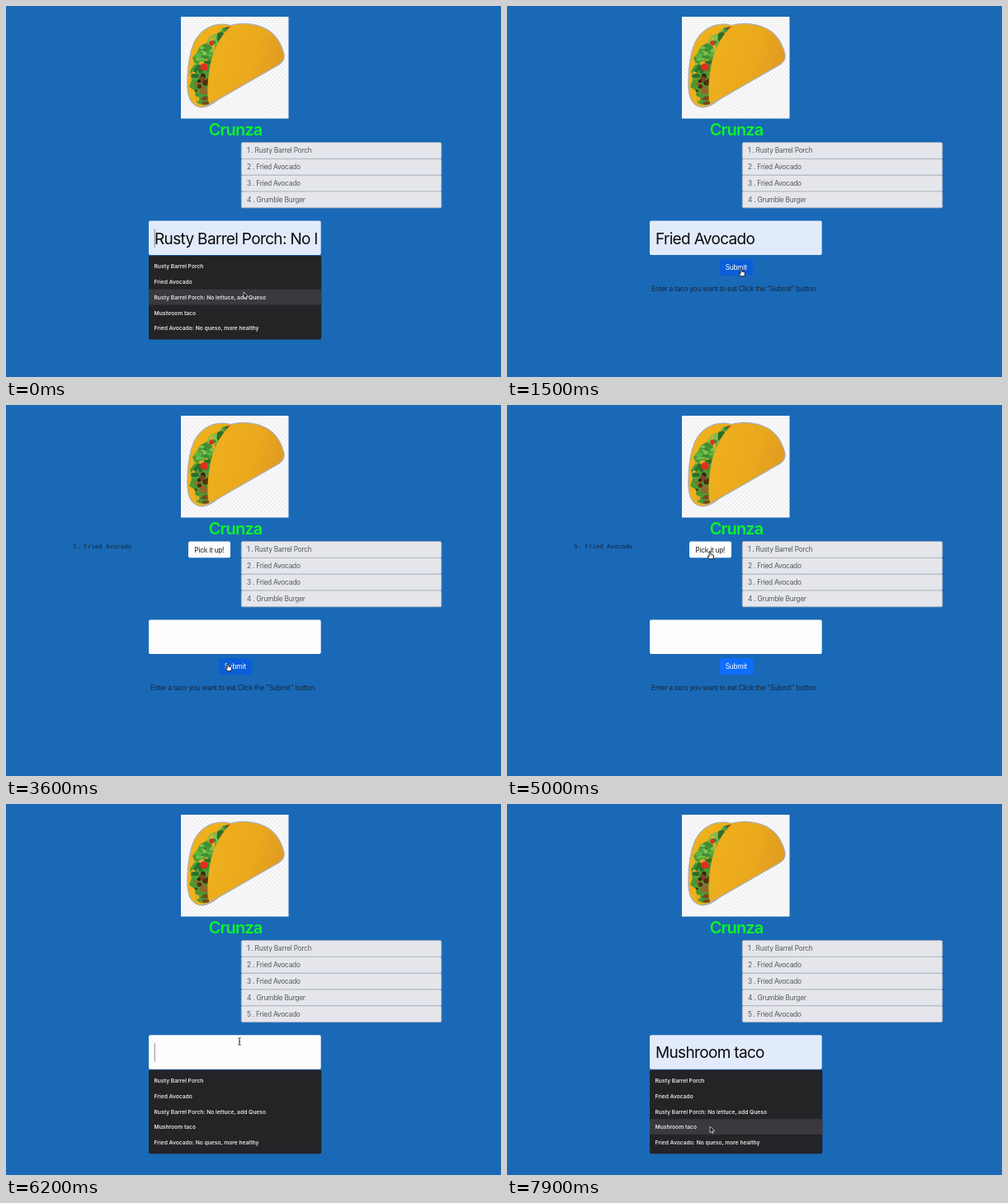
An HTML page that plays this animation: 600 by 450 pixels, repeating every 8000 ms.

```html
<!DOCTYPE html>
<html lang="en">
<head>
<meta charset="utf-8">
<title>Taco orders</title>
<style>
  html, body { margin: 0; width: 100%; height: 100%; overflow: hidden; background: #1a69b6; }
  svg { display: block; width: 600px; height: 450px; cursor: default; }
  text { font: 8.4px Inter, Roboto, sans-serif; letter-spacing: -.03em; white-space: pre; }
  .title { font-size: 20px; font-weight: 600; letter-spacing: -.045em; fill: #0cf52a; }
  .item rect { fill: #e5e6eb; stroke: #aeb3be; stroke-width: .8; }
  .item text { fill: #55595f; }
  .mono { font: 7.4px "DejaVu Sans Mono", monospace; letter-spacing: 0; fill: #12273b; }
  .field { font-size: 19px; letter-spacing: -.035em; fill: #0b0b0d; }
  .option { font-size: 6.7px; font-weight: 600; letter-spacing: 0; fill: #e4e4e6; }
  .hint { fill: #15283c; }
  .light { fill: #fff; }
</style>
</head>
<body>
<svg viewBox="0 0 600 450">
  <defs>
    <pattern id="checks" width="5" height="5" patternUnits="userSpaceOnUse">
      <rect width="5" height="5" fill="#fbfbfc"/>
      <path d="M0 0h2.5v2.5H0zM2.5 2.5H5V5H2.5z" fill="#f0f0f2"/>
    </pattern>
    <linearGradient id="shell" x1="0" y1=".2" x2="1" y2=".5">
      <stop offset="0" stop-color="#efb01c"/>
      <stop offset=".6" stop-color="#eaa91d"/>
      <stop offset="1" stop-color="#e09a22"/>
    </linearGradient>
    <clipPath id="fillClip">
      <path d="M275 24L262 27L256 33L247 37L243 45L235 49L231 57L226 63L229 70L223 79L225 90L222 98L229 103L231 117Q237 122 246 119Q243 70 275 24Z"/>
    </clipPath>
    <clipPath id="fieldClip"><rect x="179" y="261" width="198.500" height="41"/></clipPath>
  </defs>

  <rect width="600" height="450" fill="#1a69b6"/>
  <rect x="212" y="13" width="130.500" height="123.500" fill="url(#checks)"/>

  <g id="taco">
    <path d="M264 22Q240 22 228 44Q219 65 220 99Q221 121 237 123Q250 122 260 110L276 24Z"
      fill="#efb01c" stroke="#a9aeb5" stroke-width="1.200"/>
    <g id="filling" clip-path="url(#fillClip)"></g>
    <path d="M274 23Q291 19 309 25Q331 33 337 59Q338 66 331 71L251 117Q246 120 245 114Q243 94 248 69Q254 41 274 23Z"
      fill="url(#shell)"/>
    <path d="M274 23Q291 19 309 25Q331 33 337 59Q338 66 331 71L251 117Q246 121 237 123"
      fill="none" stroke="#a9aeb5" stroke-width="1.200"/>
    <g id="specks" fill="#d98f16" opacity=".45"></g>
  </g>

  <text class="title" x="278" y="157" text-anchor="middle">Crunza</text>
  <g id="list"></g>

  <g id="pending">
    <text class="mono" x="81" y="173.500">5. Fried Avocado</text>
    <rect x="221" y="165.500" width="51" height="19.800" rx="2" fill="#fdfdfd"/>
    <text x="246.300" y="178.500" text-anchor="middle" fill="#1c1e21">Pick it up!</text>
  </g>

  <g id="form">
    <rect id="ring" x="255.300" y="305.300" width="45" height="23.500" rx="4" fill="#1363c9"/>
    <rect id="submit" x="257.700" y="307.300" width="40.500" height="19.600" rx="2"/>
    <text class="light" x="277.700" y="320" text-anchor="middle">Submit</text>
    <text class="hint" x="175" y="346">Enter a taco you want to eat Click the "Submit" button.</text>
    <rect id="box" x="173" y="260.500" width="208.700" height="41.500" rx="2"/>
    <g clip-path="url(#fieldClip)"><text id="value" class="field" x="180" y="288.700"></text></g>
    <path id="caret" d="M180.200 270.500V293" stroke="#777c86" stroke-width=".9"/>
    <g id="menu">
      <rect x="173" y="302.800" width="209.300" height="101.700" rx="2" fill="#242326"/>
      <rect id="band" x="173" width="209.300" height="18.700" fill="#3a393d"/>
    </g>
  </g>

  <g id="pointer" stroke-linejoin="round">
    <path id="arrow" d="M0 0V7.500L1.800 6L3 8.600L4.300 8L3.100 5.400H5.500Z" fill="#101114" stroke="#f2f2f2" stroke-width=".7"/>
    <path id="hand" d="M-.9 0Q0 -.9 .8 0V3L4 3.900Q4.800 4.300 4.500 6L3.700 8.800H-.7L-3 5.600Q-2.600 4.400 -.9 5.500Z" fill="#f4f4f4" stroke="#101114" stroke-width=".9"/>
    <path id="beam" d="M-1.600 -4.300Q0 -4.300 0 -3V3Q0 4.300 -1.600 4.300M1.600 -4.300Q0 -4.300 0 -3M0 3Q0 4.300 1.600 4.300M-1 0H1" fill="none" stroke="#33363b" stroke-width="1"/>
  </g>
</svg>

<script>
const LOOP = 8000, STEP = 100, ROW = 18.7, MENU_TOP = 306.6, SHIFT = 19.8;
const PICK = 800, PRESS = 2800, SUBMIT = 3000, CONFIRM = 5200, OPEN = 6100;
const options = ["Rusty Barrel Porch", "Fried Avocado", "Rusty Barrel Porch: No lettuce, add Queso",
  "Mushroom taco", "Fried Avocado: No queso, more healthy"];
const orders = ["Rusty Barrel Porch", "Fried Avocado", "Fried Avocado", "Grumble Burger", "Fried Avocado"];

// time, x, y
const route = [
  [0, 288, 347], [200, 287, 346], [500, 284, 334], [800, 284, 334], [1300, 284, 319],
  [3100, 284, 319], [3600, 269, 314], [3800, 266, 308], [4500, 246, 178], [5400, 246, 178],
  [6000, 283, 288], [6500, 283, 288], [7000, 262, 340], [7600, 246, 391], [8000, 246, 391]
];

const $ = id => document.getElementById(id);
function add(parent, tag, attrs, label) {
  const el = document.createElementNS("http://www.w3.org/2000/svg", tag);
  for (const key in attrs) el.setAttribute(key, attrs[key]);
  if (label) el.textContent = label;
  parent.appendChild(el);
  return el;
}
const show = (id, on) => { $(id).style.display = on ? "" : "none"; };

let seed = 11;
const rand = () => (seed = seed * 16807 % 2147483647) / 2147483647;

function drawTaco() {
  const g = $("filling");
  add(g, "rect", { x: 218, y: 20, width: 60, height: 105, fill: "#4c9a33" });
  const greens = ["#5cb340", "#3c8f34", "#7fc152", "#2d6e2a", "#e6ab22"];
  const browns = ["#54300f", "#7a481d", "#3a220f", "#9a6529"];
  for (let i = 0; i < 80; i++) {
    const u = i / 80, v = 1 - u;
    const x = v * v * 268 + 2 * u * v * 226 + u * u * 239 + (rand() - .5) * 18;
    const y = v * v * 26 + 2 * u * v * 50 + u * u * 118 + (rand() - .5) * 6;
    const set = u > .68 && x > 230 ? browns : greens;
    add(g, "ellipse", {
      cx: x, cy: y, rx: 1.8 + rand() * 3, ry: 1.2 + rand() * 2.6,
      fill: set[Math.floor(rand() * set.length)]
    });
  }
  for (const [cx, cy, r] of [[240, 74, 4.6], [249, 45, 2.8], [270, 27, 2]])
    add(g, "circle", { cx, cy, r, fill: "#e32d1d" });
  for (let i = 0; i < 14; i++)
    add($("specks"), "circle", { cx: 261 + rand() * 60, cy: 38 + rand() * 36, r: .6 + rand() * .5 });
}

function drawLists() {
  orders.forEach((name, i) => {
    const y = 165.6 + i * SHIFT;
    const g = add($("list"), "g", { class: "item", id: "order" + i });
    add(g, "rect", { x: 285.3, y, width: 242.4, height: SHIFT, rx: 1.5 });
    add(g, "text", { x: 292, y: y + 12.8 }, `${i + 1} . ${name}`);
  });
  options.forEach((name, i) =>
    add($("menu"), "text", { class: "option", x: 179.5, y: 318.4 + i * ROW }, name));
}

function pointerAt(t) {
  const i = route.findIndex(p => p[0] > t);
  const [t0, x0, y0] = route[i - 1], [t1, x1, y1] = route[i];
  const u = (t - t0) / (t1 - t0), e = u * u * (3 - 2 * u);
  return [x0 + (x1 - x0) * e, y0 + (y1 - y0) * e];
}

const inside = (x, y, l, t, r, b) => x >= l && x <= r && y >= t && y <= b;

function draw(t) {
  const [x, y] = pointerAt(t);
  const shift = t >= CONFIRM ? SHIFT : 0, fy = y - shift;
  const open = t < PICK || t >= OPEN;
  const pending = t >= SUBMIT && t < CONFIRM;
  const row = Math.floor((fy - MENU_TOP) / ROW);
  const hover = open && row >= 0 && row < options.length ? row : -1;
  const overSubmit = !open && inside(x, fy, 257, 307, 298, 327);
  const overPick = pending && inside(x, y, 221, 165, 272, 185);
  const overField = inside(x, fy, 173, 260, 382, 302);
  const value = hover >= 0 ? options[hover] : t >= PICK && t < SUBMIT ? options[1] : "";

  $("form").setAttribute("transform", `translate(0 ${shift})`);
  $("value").textContent = value;
  $("box").setAttribute("fill", value ? "#e2ebfc" : "#fdfdfd");
  $("submit").setAttribute("fill", overSubmit ? "#0b5ed7" : "#0d6efd");
  $("band").setAttribute("y", MENU_TOP - .3 + Math.max(hover, 0) * ROW);
  show("band", hover >= 0);
  show("menu", open);
  show("caret", open && t % 1000 < 500);
  show("ring", t >= PRESS && t < SUBMIT);
  show("pending", pending);
  show("order4", t >= CONFIRM);

  const kind = overSubmit || overPick ? "hand" : overField ? "beam" : "arrow";
  for (const k of ["hand", "beam", "arrow"]) show(k, k === kind);
  $("pointer").setAttribute("transform", `translate(${x} ${y})`);
}

function tick() {
  const t = (performance.now() - start) % LOOP;
  draw(Math.floor(t / STEP) * STEP);
  requestAnimationFrame(tick);
}

drawTaco();
drawLists();
const start = performance.now();
tick();
</script>
</body>
</html>
```
